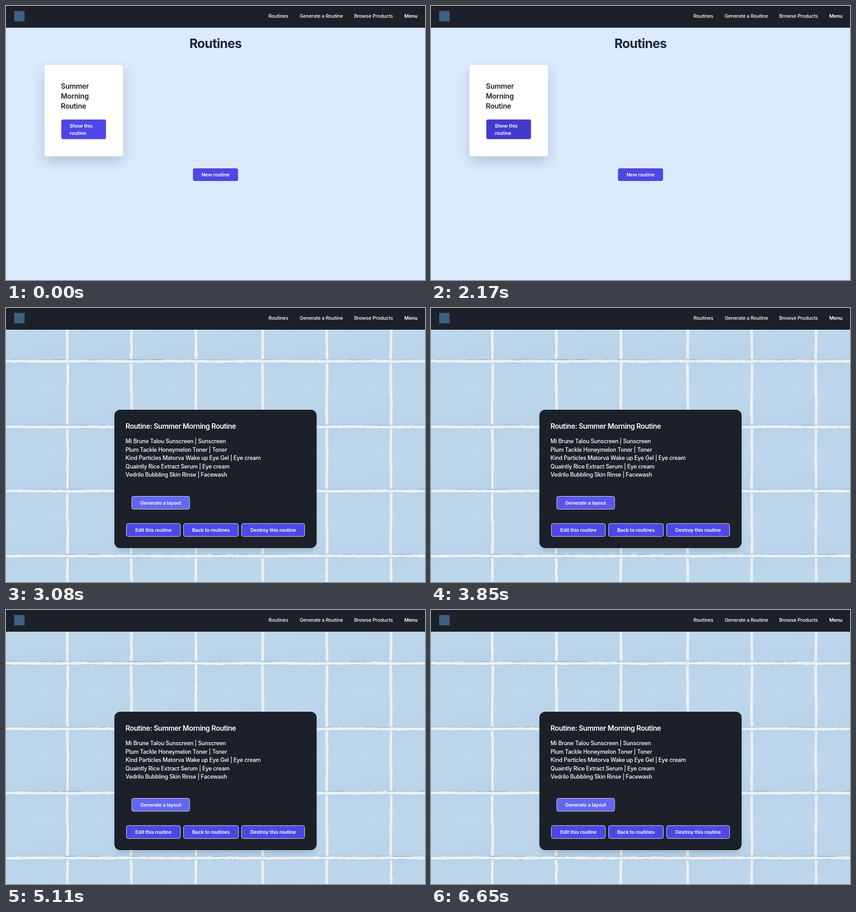
An HTML page that plays this animation: 924 by 606 pixels, repeating every 8000 ms.

```html
<!DOCTYPE html>
<html lang="en">
<head>
<meta charset="utf-8">
<title>Routines</title>
<style>
  html, body { margin: 0; width: 100%; height: 100%; overflow: hidden; background: #dbeafe; }
  svg { display: block; width: 924px; height: 606px; font-family: Inter, sans-serif; }
  text { fill: #fff; letter-spacing: -.012em; white-space: pre; }
  .nav { font-size: 10.9px; font-weight: 500; letter-spacing: -.018em; }
  .menu, .label { font-size: 10.9px; font-weight: 600; }
  .title { font-size: 28px; font-weight: 700; letter-spacing: -.023em; fill: #1b2836; }
  .name { font-size: 15.56px; font-weight: 600; letter-spacing: -.014em; fill: #1c2129; }
  .heading { font-size: 15.56px; font-weight: 600; letter-spacing: -.028em; }
  .item { font-size: 12.44px; font-weight: 500; letter-spacing: -.02em; }
  .button { fill: #4f46e5; }
  .outlined { stroke: #e5e7eb; }
  .dark { fill: #1c2129; }
  .mid { text-anchor: middle; }
</style>
</head>
<body>
<svg viewBox="0 0 924 606">
  <defs>
    <filter id="blur" x="-50%" y="-50%" width="200%" height="200%"><feGaussianBlur stdDeviation="15"/></filter>
    <filter id="soft"><feGaussianBlur stdDeviation="6"/></filter>
    <linearGradient id="tile" x1="0" y1="0" x2=".15" y2="1">
      <stop offset="0" stop-color="#b9d3ea"/>
      <stop offset=".5" stop-color="#bed7ec"/>
      <stop offset="1" stop-color="#b9d3ea"/>
    </linearGradient>
  </defs>

  <g id="list">
    <rect width="924" height="606" fill="#dbeafe"/>
    <text class="title mid" x="462" y="92.7">Routines</text>
    <rect x="84.5" y="141" width="174" height="203" rx="6" opacity=".17" filter="url(#blur)"/>
    <rect x="84.5" y="129.5" width="174" height="203" rx="5" fill="#fff" stroke="#d8dfe8"/>
    <text class="name" x="121" y="183.4">Summer</text>
    <text class="name" x="121" y="205.2">Morning</text>
    <text class="name" x="121" y="227">Routine</text>
    <rect id="show" class="button" x="122" y="251" width="98.5" height="43.5" rx="4"/>
    <text class="label" x="140.6" y="269">Show this</text>
    <text class="label" x="140.6" y="284.6">routine</text>
    <rect class="button" x="412.3" y="359" width="99.4" height="28" rx="4"/>
    <text class="label mid" x="462" y="376.8">New routine</text>
  </g>

  <g id="detail">
    <g id="wall"></g>
    <rect x="243" y="233" width="438" height="304" rx="13" opacity=".14" filter="url(#soft)"/>
    <rect class="dark" x="239" y="225" width="446" height="306" rx="13"/>
    <text class="heading" x="263.5" y="267.4">Routine: Summer Morning Routine</text>
    <g id="items"></g>
    <g id="buttons"></g>
  </g>

  <rect class="dark" width="924" height="48"/>
  <rect x="18" y="11" width="23" height="23" fill="#3d5f82"/>
  <text class="nav" x="578.7" y="26.4">Routines</text>
  <text class="nav" x="647.4" y="26.4">Generate a Routine</text>
  <text class="nav" x="767.8" y="26.4">Browse Products</text>
  <text class="menu" x="878.3" y="26.4">Menu</text>
</svg>
<script>
const $ = id => document.getElementById(id);

function add(parent, tag, attrs, text = '') {
  const node = document.createElementNS('http://www.w3.org/2000/svg', tag);
  for (const key in attrs) node.setAttribute(key, attrs[key]);
  node.textContent = text;
  return parent.appendChild(node);
}

let seed = 7;
const random = () => (seed = seed * 16807 % 2147483647) / 2147483647;

// A strip with rough edges, from a to b along one axis.
function strip(center, a, b, width, vertical, fill, rough = 1) {
  const sides = [[], []];
  for (let p = a; p < b + 5; p += 5) {
    const bend = Math.sin(p / 31 + center) * .4;
    sides.forEach((side, i) => {
      const edge = (i - .5) * width + bend + (random() - .5) * 1.2 * rough;
      const q = (center + edge).toFixed(1);
      side.push(vertical ? `${q},${p}` : `${p},${q}`);
    });
  }
  const points = [...sides[0], ...sides[1].reverse()].join(' ');
  add($('wall'), 'polygon', { points, fill });
}

function buildWall() {
  const wall = $('wall');
  const columns = [135.5, 276.5, 418.8, 566, 707.5, 849];
  const rows = [117.8, 262.8, 404.8, 548.3];
  const xs = [-6, ...columns, 990], ys = [-26, ...rows, 692];
  for (let r = 0; r < 5; r++) {
    for (let c = 0; c < 7; c++) {
      add(wall, 'rect', {
        x: xs[c], y: ys[r], width: xs[c + 1] - xs[c], height: ys[r + 1] - ys[r], fill: 'url(#tile)'
      });
    }
  }
  for (const x of columns) {
    strip(x, 48, 606, 7, true, '#b5cde2');
    strip(x, 48, 606, 6, true, '#edf0f2');
  }
  for (const y of rows) {
    strip(y, 0, 924, 11, false, '#b0d0ea80', .5);
    strip(y - .3, 0, 924, 7.4, false, '#a6c2db');
    strip(y + .1, 0, 924, 6.2, false, '#edf0f2');
    for (let i = 0; i < 22; i++) {
      const x = random() * 924;
      strip(y - 3.4, x, x + 8 + random() * 20, .7, false, '#86abca', .5);
    }
  }
}

function addButton(x, y, width, label) {
  const box = add($('buttons'), 'rect', { class: 'button outlined', x, y, width, height: 28.5, rx: 4 });
  add($('buttons'), 'text', { class: 'label mid', x: x + width / 2, y: y + 18 }, label);
  return box;
}

buildWall();
[
  'Mi Brune Talou Sunscreen | Sunscreen',
  'Plum Tackle Honeymelon Toner | Toner',
  'Kind Particles Matorva Wake up Eye Gel | Eye cream',
  'Quaintly Rice Extract Serum | Eye cream',
  'Vedrilo Bubbling Skin Rinse | Facewash'
].forEach((text, i) => add($('items'), 'text', { class: 'item', x: 263.6, y: 299 + i * 18.62 }, text));

const generate = addButton(277.3, 416.5, 127.6, 'Generate a layout');
addButton(265.5, 476.8, 119, 'Edit this routine');
addButton(391.5, 476.8, 121, 'Back to routines');
addButton(519.5, 476.8, 139, 'Destroy this routine');

const base = [79, 70, 229], pressed = [68, 57, 205], hover = [99, 102, 241];
const mix = (to, k) => `rgb(${base.map((v, i) => Math.round(v + (to[i] - v) * k))})`;

// Progress in whole 70 ms steps, the first one taken at the start time.
const ramp = (t, start, steps) =>
  Math.min(1, Math.max(0, (Math.floor((t - start) / 70 + 1e-6) + 1) / steps));

function draw(now) {
  const t = now % 8000;
  const opened = t >= 2450;
  $('list').style.display = opened ? 'none' : '';
  $('detail').style.display = opened ? '' : 'none';
  $('show').style.fill = mix(pressed, ramp(t, 1960, 4));
  generate.style.fill = mix(hover, ramp(t, 2940, 3) - ramp(t, 3850, 2) + ramp(t, 4060, 2));
  requestAnimationFrame(draw);
}
draw(performance.now());
</script>
</body>
</html>
```
